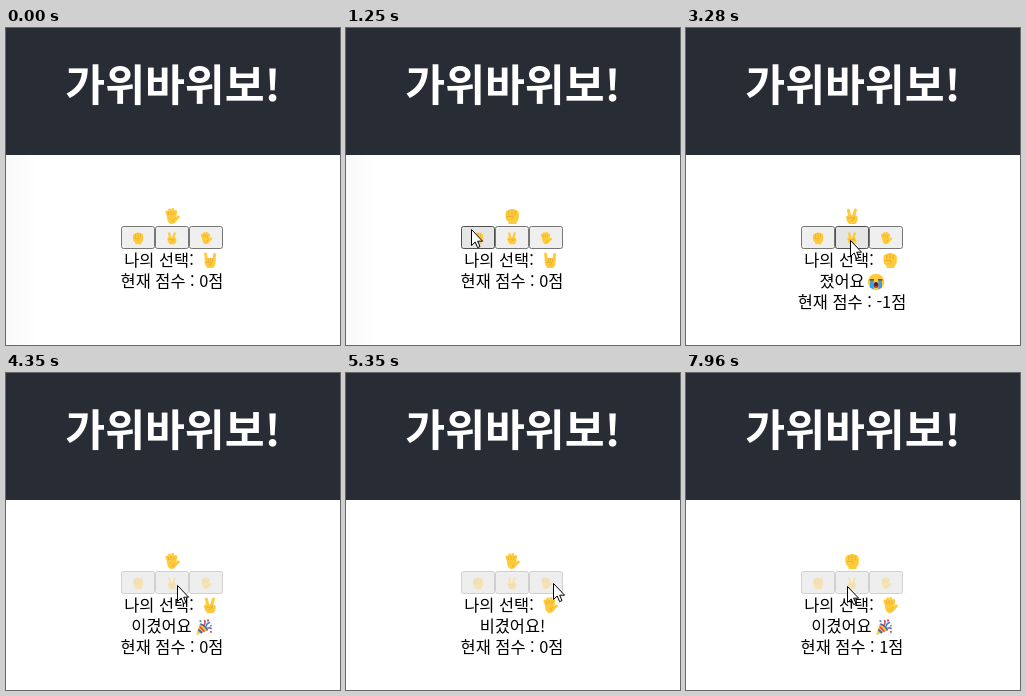
An HTML page that plays this animation: 334x317 px, repeating every 8000 ms.

```html
<!DOCTYPE html>
<html lang="ko">
<head>
<meta charset="utf-8">
<style>
html, body { margin: 0; height: 100%; overflow: hidden; background: #fff; }
svg { display: block; }
text { font: 300 16.4px "Noto Sans CJK KR", "Noto Sans KR", "Noto Sans CJK", sans-serif; text-anchor: middle; }
#title { font-size: 43.3px; font-weight: 700; fill: #fff; }
.finger { fill: none; stroke: #ffcb3a; stroke-width: 3; stroke-linecap: round; }
.skin { fill: #ffcb3a; }
.fold { fill: none; stroke: #e3a22c; stroke-width: .7; stroke-linecap: round; }
.btn rect { fill: #efefef; stroke: #767676; }
.btn.hover rect { fill: #e5e5e5; stroke: #4f4f4f; }
.btn.down rect { fill: #f5f5f5; stroke: #8d8d8d; }
.btn.off rect { fill: #eee; stroke: #d0d0d0; }
.btn.off use { opacity: .3; }
</style>
</head>
<body>
<svg width="334" height="317" viewBox="0 0 334 317">
  <defs>
    <linearGradient id="fade"><stop stop-color="#f9f9f9"/><stop offset="1" stop-color="#fff"/></linearGradient>
    <symbol id="rock" viewBox="0 0 18 18">
      <path class="skin" d="M2.5 6Q2.5 3.5 5 3.2Q9 1 13 3Q16 3.5 15.8 7V11Q15 14 13.5 15V17H5.5V15Q2.5 13 2.5 10Z"/>
      <path class="fold" d="M5.8 4V8M9 3V8M12.2 4V8M4 9.5H10Q12 10.5 9 12"/>
    </symbol>
    <symbol id="scissors" viewBox="0 0 18 18">
      <path class="finger" d="M7 10L5.4 3.2M10.4 10L12.4 3"/>
      <path class="skin" d="M3 10Q3.4 8 6.5 8.2H12Q15 8.6 14.8 12Q14 15.5 12.4 17H6.2Q3 14 3 10Z"/>
      <path class="fold" d="M4.6 11H10.5Q11.5 12.5 8 14M11.4 9V11.5"/>
    </symbol>
    <symbol id="paper" viewBox="0 0 18 18">
      <path class="finger" d="M5.4 9L4 5M7 8L6.6 3M9.6 8L9.8 2.6M11.8 9L12.8 4.6M11.8 13.4L15.4 10"/>
      <path class="skin" d="M3.8 8H13.4V12Q13 16.8 8.8 17Q5.4 17 4.4 13Z"/>
      <path class="fold" d="M5.6 7.6L5.2 5M8.2 7.4V4.4M10.8 7.6L11.2 5M11.6 11.4Q9.6 12.4 9.8 14.6"/>
    </symbol>
    <symbol id="horns" viewBox="0 0 18 18">
      <path class="finger" d="M5.4 9L4.6 3M13 9L13.6 3.4"/>
      <path class="skin" d="M3.6 8Q9 6 14.6 8V12Q13.8 15.5 12.2 17H6.4Q3.6 14.5 3.6 11Z"/>
      <path class="fold" d="M7.2 7.6V10.5M9.4 7.4V10.5M11.6 7.8V10.5M5.6 11.6H10.6Q11.4 12.8 8.4 14"/>
    </symbol>
    <symbol id="cry" viewBox="0 0 18 18">
      <circle class="skin" cx="9" cy="9" r="8.3"/>
      <path fill="#35a0e8" d="M3 7.5H6.6V16.5L3 14.5ZM11.4 7.5H15V14.5L11.4 16.5Z"/>
      <path fill="none" stroke="#3b2f2b" stroke-width="1.2" d="M2.8 6.8H7M11 6.8H15.2"/>
      <ellipse cx="9" cy="12" rx="2.3" ry="3" fill="#5c2230"/>
      <path fill="#e8485c" d="M7.2 13.5Q9 12.5 10.8 13.5Q9 16 7.2 13.5Z"/>
    </symbol>
    <symbol id="party" viewBox="0 0 18 18">
      <path class="skin" d="M1 17L5 5Q11 7 13 12.5Z"/>
      <path fill="none" stroke="#3b6f9e" stroke-width="1.8" d="M3.4 11.5L7 15M5.4 6Q10.5 7.5 12.4 12.4"/>
      <path fill="none" stroke="#e8485c" stroke-width="1.6" d="M4.8 8.6L9.4 13.6M9 7Q11 5 9.4 2"/>
      <path fill="none" stroke="#2f8fd8" stroke-width="1.5" d="M11 8.6Q11.5 5 15 4.4"/>
      <path fill="none" stroke="#8a56b8" stroke-width="1.5" d="M12.4 10.4Q14.5 9 16.6 11"/>
      <path fill="#e8485c" d="M12 1.5h2v2h-2zM15 13h1.8v1.8H15z"/>
      <path fill="#2f8fd8" d="M4.5 2.2h1.8v1.8H4.5zM15.2 7h1.6v1.6h-1.6z"/>
    </symbol>
  </defs>

  <rect id="shade" y="127" width="30" height="190" fill="url(#fade)"/>
  <rect width="334" height="127" fill="#282c34"/>
  <text id="title" x="167" y="72.5">가위바위보!</text>
  <use id="rival" x="157" y="179" width="18" height="18"/>
  <g id="buttons"></g>
  <text x="153" y="238">나의 선택:</text>
  <use id="mine" x="195" y="223" width="18" height="18"/>
  <text id="verdict" y="259"></text>
  <use id="mood" y="245" width="18" height="18"/>
  <text id="score" x="166"></text>
  <circle id="press" cx="-1" cy="-.5" r="11.5" fill="#ff0" fill-opacity=".6"/>
  <path id="cursor" d="M-.5 .5V16.5L3.2 13L5.6 18.6L8 17.6L5.7 12.2H10.6Z" fill="#fff" stroke="#000"/>
</svg>
<script>
const LOOP = 8000, TICK = 100;
const hands = ['rock', 'scissors', 'paper'];
const $ = id => document.getElementById(id);

// open: buttons usable; roll: rival's hand starts changing from `first`;
// press: mouse down; end: result appears
const rounds = [
  { open: 0, roll: 130, first: 1, press: 1670, end: 1730, rival: 2, mine: 'rock', verdict: '졌어요', x: 156, mood: 'cry', moodX: 181, score: -1 },
  { open: 2740, roll: 2880, first: 0, press: 3420, end: 3550, rival: 2, mine: 'scissors', verdict: '이겼어요', x: 155.5, mood: 'party', moodX: 189, score: 0 },
  { open: 4550, roll: 4750, first: 0, press: 5280, end: 5350, rival: 2, mine: 'paper', verdict: '비겼어요!', x: 166.5, score: 0 },
  { open: 6360, roll: 6560, first: 1, press: 6880, end: 7020, rival: 0, mine: 'paper', verdict: '이겼어요', x: 155.5, mood: 'party', moodX: 189, score: 1 }
];
const start = { rival: 2, mine: 'horns', verdict: '', x: 0, score: 0 };

// time, x, y of the pointer tip
const path = [
  [130, 320, 294], [400, 285, 215], [650, 262, 182], [900, 228, 163],
  [1100, 160, 182], [1250, 126, 201], [1530, 126, 210], [2810, 126, 210],
  [2880, 130, 211], [3280, 165, 212], [4280, 165, 212], [4350, 172, 212],
  [4550, 208, 210], [7480, 208, 210], [7550, 203, 210], [7960, 162, 213]
];

$('buttons').innerHTML = hands.map((hand, i) => `<g class="btn">
  <rect x="${115.5 + 34 * i}" y="198.5" width="33" height="22" rx="2"/>
  <use href="#${hand}" x="${125 + 34 * i}" y="203" width="14" height="14"/></g>`).join('');
const buttons = [...document.querySelectorAll('.btn')];

function pointer(t) {
  const i = path.findIndex(p => p[0] > t);
  if (i < 1) return path[i ? path.length - 1 : 0].slice(1);
  const [a, b] = [path[i - 1], path[i]], k = (t - a[0]) / (b[0] - a[0]);
  return [1, 2].map(n => Math.round(a[n] + (b[n] - a[n]) * k));
}

function show(id, visible) {
  $(id).setAttribute('visibility', visible ? 'visible' : 'hidden');
}

function draw(t) {
  const n = rounds.findLastIndex(r => t >= r.open), round = rounds[n];
  const done = t >= round.end, pressed = t >= round.press && !done;
  const state = done ? round : rounds[n - 1] || start;
  const rolled = Math.floor((Math.min(t, round.press) - round.roll) / TICK);
  const rival = done || t < round.roll ? state.rival : (round.first + rolled) % 3;
  const [x, y] = pointer(t);

  $('rival').setAttribute('href', '#' + hands[rival]);
  $('mine').setAttribute('href', '#' + state.mine);
  $('verdict').textContent = state.verdict;
  $('verdict').setAttribute('x', state.x);
  show('mood', state.mood);
  if (state.mood) {
    $('mood').setAttribute('href', '#' + state.mood);
    $('mood').setAttribute('x', state.moodX);
  }
  $('score').textContent = `현재 점수 : ${state.score}점`;
  $('score').setAttribute('y', state.verdict ? 280 : 259);

  const over = t >= 130 && y >= 198 && y < 221 ? Math.floor((x - 115) / 34) : -1;
  buttons.forEach((b, i) => {
    const look = done ? 'off' : i !== over ? '' : pressed ? 'down' : 'hover';
    b.setAttribute('class', 'btn ' + look);
  });

  show('shade', t < rounds[0].end);
  show('press', pressed);
  show('cursor', t >= 130);
  for (const id of ['press', 'cursor']) $(id).setAttribute('transform', `translate(${x} ${y})`);
}

let began;
function frame(now) {
  began ??= now;
  draw((now - began) % LOOP);
  requestAnimationFrame(frame);
}
draw(0);
requestAnimationFrame(frame);
</script>
</body>
</html>
```
